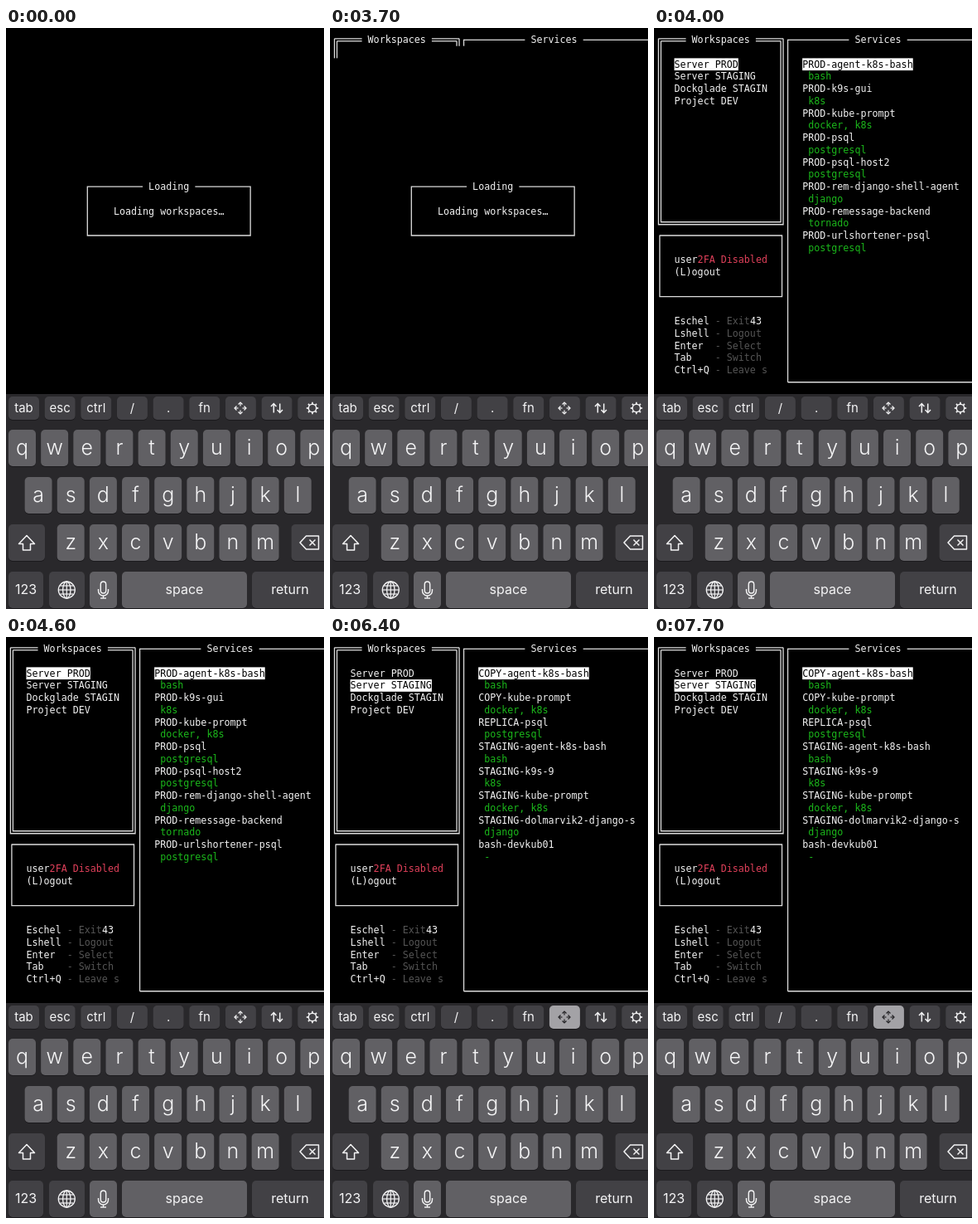
These frames come from a looping animation (384 by 700 pixels, 8000 ms). An HTML page with a canvas:

```html
<!DOCTYPE html>
<html lang="en">
<head>
<meta charset="utf-8">
<title>Terminal workspaces</title>
<style>
  html, body { margin: 0; width: 100%; height: 100%; overflow: hidden; background: #000; }
  canvas { display: block; width: 384px; height: 700px; }
</style>
</head>
<body>
<canvas id="stage" width="384" height="700"></canvas>
<script>
const ctx = document.getElementById('stage').getContext('2d');
const LOOP = 8000, HEADER = 3700, LIST = 4000, PRESS = 4800, SWITCH = 6400;

// Terminal grid
const CW = 7.03, RH = 14.73, X0 = 3.4, Y0 = 14.3;
const WHITE = '#f2f2f2', GREEN = '#1bb81b', RED = '#e0405a', GRAY = '#555';
const colX = c => X0 + c * CW;
const midX = c => colX(c) + CW / 2;
const rowY = r => Y0 + r * RH;

const workspaces = ['Server PROD', 'Server STAGING', 'Dockglade STAGIN', 'Project DEV'];
const services = [
  [['PROD-agent-k8s-bash', 'bash'], ['PROD-k9s-gui', 'k8s'], ['PROD-kube-prompt', 'docker, k8s'],
   ['PROD-psql', 'postgresql'], ['PROD-psql-host2', 'postgresql'],
   ['PROD-rem-django-shell-agent', 'django'], ['PROD-remessage-backend', 'tornado'],
   ['PROD-urlshortener-psql', 'postgresql']],
  [['COPY-agent-k8s-bash', 'bash'], ['COPY-kube-prompt', 'docker, k8s'], ['REPLICA-psql', 'postgresql'],
   ['STAGING-agent-k8s-bash', 'bash'], ['STAGING-k9s-9', 'k8s'],
   ['STAGING-kube-prompt', 'docker, k8s'], ['STAGING-dolmarvik2-django-s', 'django'],
   ['bash-devkub01', '-']]
];
const hints = [['Eschel', 'Exit'], ['Lshell', 'Logout'], ['Enter', 'Select'], ['Tab', 'Switch'], ['Ctrl+Q', 'Leave s']];

function line(color, width, ...pts) {
  ctx.strokeStyle = color;
  ctx.lineWidth = width;
  ctx.beginPath();
  pts.forEach(([x, y], i) => i ? ctx.lineTo(x, y) : ctx.moveTo(x, y));
  ctx.stroke();
}

function term(s, col, row, color = WHITE) {
  ctx.font = '11.68px "DejaVu Sans Mono", monospace';
  ctx.textAlign = 'left';
  ctx.textBaseline = 'alphabetic';
  ctx.fillStyle = color;
  ctx.fillText(s, colX(col), rowY(row) + 4);
}

function item(s, col, row, selected) {
  if (selected) {
    ctx.fillStyle = '#fff';
    ctx.fillRect(colX(col), rowY(row) - RH / 2, s.length * CW, RH);
  }
  term(s, col, row, selected ? '#000' : WHITE);
}

const edge = (...pts) => line('#dcdcdc', 1.3, ...pts);

function titledTop(title, titleCol, left, right, y) {
  edge([left, y], [colX(titleCol - 1), y]);
  edge([colX(titleCol + title.length + 1), y], [right, y]);
}

function box(c0, r0, c1, r1) {
  const l = midX(c0), r = midX(c1), t = rowY(r0), b = rowY(r1);
  edge([l, t], [r, t], [r, b], [l, b], [l, t - 0.6]);
}

function workspaceFrame(full) {
  for (const d of [-1.5, 1.5]) {
    const l = midX(0) + d, r = midX(21) - d, t = rowY(0) + d, b = rowY(15) - d;
    titledTop('Workspaces', 6, l, r, t);
    if (full) edge([l, t], [l, b], [r, b], [r, t]);
    else {
      edge([l, t], [l, rowY(1.5)]);
      edge([r, t], [r, rowY(0.5)]);
    }
  }
  term('Workspaces', 6, 0);
}

function serviceFrame(full) {
  const x = midX(22), y = rowY(0), b = rowY(full ? 28 : 0.5);
  titledTop('Services', 34, x, 384, y);
  edge([x, y - 0.6], [x, b]);
  if (full) edge([x, b], [384, b]);
  term('Services', 34, 0);
}

function loading() {
  box(13, 12, 41, 14 + 2);
  ctx.fillStyle = '#000';
  ctx.fillRect(colX(23), rowY(12) - 7, 9 * CW, 14);
  term('Loading', 24, 12);
  term('Loading workspaces…', 18, 14);
}

function lists(sel) {
  workspaces.forEach((s, i) => item(s, 3, 2 + i, i === sel));
  services[sel].forEach(([name, kind], i) => {
    item(name, 25, 2 + 2 * i, i === 0);
    term(kind, 26, 3 + 2 * i, GREEN);
  });
  box(0, 16, 21, 21);
  term('user', 3, 18);
  term('2FA Disabled', 7, 18, RED);
  term('(L)ogout', 3, 19);
  hints.forEach(([key, action], i) => {
    term(key, 3, 23 + i);
    term('- ' + action, 10, 23 + i, GRAY);
  });
  term('43', 16, 23);
}

// Keyboard
const DARK = '#424145', LIGHT = '#616064', INK = '#f4f4f5';

function key(x, y, w, h, fill, label, size, weight = 400, dy = 0) {
  ctx.fillStyle = '#1b1a1d';
  ctx.beginPath();
  ctx.roundRect(x, y + 1, w, h, 5);
  ctx.fill();
  ctx.fillStyle = fill;
  ctx.beginPath();
  ctx.roundRect(x, y, w, h, 5);
  ctx.fill();
  if (!label) return;
  ctx.font = `${weight} ${size}px Inter, Roboto, sans-serif`;
  ctx.textAlign = 'center';
  ctx.textBaseline = 'alphabetic';
  ctx.fillStyle = INK;
  ctx.fillText(label, x + w / 2, y + h / 2 + size * 0.34 + dy);
}

function at(x, y, draw, turn = 0) {
  ctx.save();
  ctx.translate(x, y);
  ctx.rotate(turn);
  draw();
  ctx.restore();
}

function moveIcon(x, y, color) {
  for (let i = 0; i < 4; i++) at(x, y, () => {
    line(color, 1.2, [0, -2.5], [0, -7]);
    line(color, 1.2, [-2.5, -4.5], [0, -7], [2.5, -4.5]);
  }, i * Math.PI / 2);
}

function swapIcon(x, y) {
  for (const turn of [0, Math.PI]) at(x, y, () => {
    line(INK, 1.5, [-3.7, 5.5], [-3.7, -5]);
    line(INK, 1.5, [-7, -2], [-3.7, -5.5], [-0.6, -2]);
  }, turn);
}

function gearIcon(x, y) {
  ctx.strokeStyle = INK;
  ctx.lineWidth = 1.5;
  ctx.beginPath();
  ctx.arc(x, y, 4.7, 0, 7);
  ctx.stroke();
  for (let i = 0; i < 8; i++)
    at(x, y, () => line(INK, 1.7, [0, -4.8], [0, -7.2]), i * Math.PI / 4);
}

function shiftIcon(x, y) {
  at(x, y, () => {
    ctx.lineJoin = 'round';
    line(INK, 1.5, [0, -9], [9.5, 1], [4.5, 1], [4.5, 8.5], [-4.5, 8.5], [-4.5, 1], [-9.5, 1], [0, -9], [1, -8]);
  });
}

function deleteIcon(x, y) {
  at(x, y, () => {
    ctx.lineJoin = 'round';
    line(INK, 1.5, [-11.5, 0], [-4, -8], [11, -8], [11, 8], [-4, 8], [-11.5, 0], [-10, -1.6]);
    line(INK, 1.5, [0, -3.5], [7, 3.5]);
    line(INK, 1.5, [7, -3.5], [0, 3.5]);
  });
}

function globeIcon(x, y) {
  ctx.strokeStyle = INK;
  ctx.lineWidth = 1.3;
  for (const rx of [10, 4.7]) {
    ctx.beginPath();
    ctx.ellipse(x, y, rx, 10, 0, 0, 7);
    ctx.stroke();
  }
  at(x, y, () => {
    line(INK, 1.2, [-10, 0], [10, 0]);
    line(INK, 1.2, [0, -10], [0, 10]);
    line(INK, 1.2, [-8, -5], [8, -5]);
    line(INK, 1.2, [-8, 5], [8, 5]);
  });
}

function micIcon(x, y) {
  ctx.strokeStyle = INK;
  ctx.lineWidth = 1.4;
  ctx.beginPath();
  ctx.roundRect(x - 3.2, y - 10, 6.4, 14, 3.2);
  ctx.stroke();
  ctx.beginPath();
  ctx.moveTo(x - 6, y - 1);
  ctx.lineTo(x - 6, y + 1);
  ctx.arc(x, y + 1, 6, Math.PI, 0, true);
  ctx.lineTo(x + 6, y - 1);
  ctx.stroke();
  line(INK, 1.4, [x, y + 7], [x, y + 10]);
  line(INK, 1.4, [x - 3.5, y + 10], [x + 3.5, y + 10]);
}

function keyboard(pressed) {
  ctx.fillStyle = '#29282b';
  ctx.fillRect(0, 441, 384, 259);
  ['tab', 'esc', 'ctrl', '/', '.', 'fn', '', '', ''].forEach((s, i) =>
    key(3 + i * 43.65, 444, 37, 28, pressed && i === 6 ? '#a3a2a6' : DARK, s, 15));
  moveIcon(283, 458, pressed ? '#252427' : INK);
  swapIcon(327, 458);
  gearIcon(370, 458);

  ['qwertyuiop', 'asdfghjkl', 'zxcvbnm'].forEach((row, r) =>
    [...row].forEach((s, i) =>
      key([3, 22.6, 61.7][r] + i * 39.15, 484 + r * 57, 33, 44, LIGHT, s, 25, 300, -0.5)));

  key(3, 598, 44, 44, DARK);
  shiftIcon(25, 620.5);
  key(344.5, 598, 44, 44, DARK);
  deleteIcon(366.5, 620);

  key(3, 655, 42, 44, DARK, '123', 16);
  key(52, 655, 43, 44, DARK);
  globeIcon(73.3, 677);
  key(101, 655, 33, 44, LIGHT);
  micIcon(117.5, 677);
  key(140, 655, 151, 44, LIGHT, 'space', 16);
  key(297, 655, 92, 44, DARK, 'return', 16);
}

function draw(t) {
  ctx.fillStyle = '#000';
  ctx.fillRect(0, 0, 384, 700);
  if (t >= HEADER) {
    workspaceFrame(t >= LIST);
    serviceFrame(t >= LIST);
  }
  if (t < LIST) loading();
  else lists(t < SWITCH ? 0 : 1);
  keyboard(t >= PRESS);
}

const start = performance.now();
function tick() {
  draw((performance.now() - start) % LOOP);
  requestAnimationFrame(tick);
}
tick();
</script>
</body>
</html>
```
